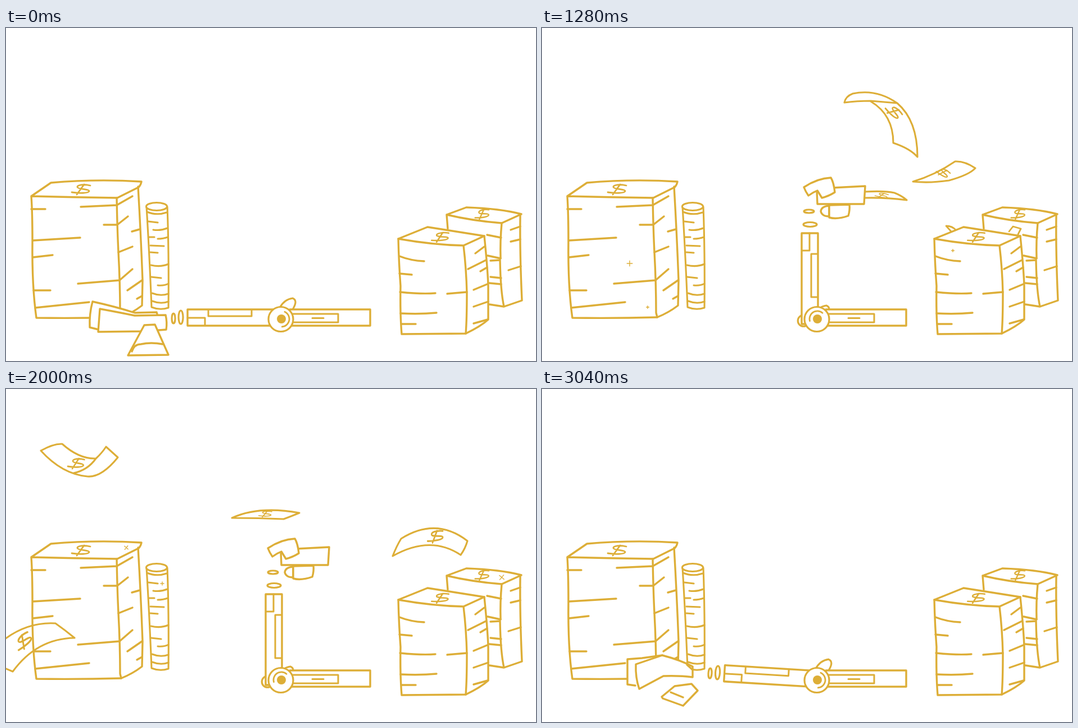
These frames come from a looping animation (943x594 px, 3120 ms). An HTML page with a canvas:

```html
<!DOCTYPE html>
<html lang="en">
<head>
<meta charset="utf-8">
<title>Money arm</title>
<style>
html, body { margin: 0; width: 100%; height: 100%; overflow: hidden; background: #fff; }
canvas { display: block; width: 943px; height: 594px; }
</style>
</head>
<body>
<canvas id="stage"></canvas>
<script>
const W = 943, H = 594, LOOP = 3120, STEP = 80;
const GOLD = '#ddae37';
const PIVOT = [475, 518];
const rad = d => d * Math.PI / 180;

const cv = document.getElementById('stage');
const dpr = window.devicePixelRatio || 1;
cv.width = W * dpr;
cv.height = H * dpr;
const c = cv.getContext('2d');

const cache = {};
const path = d => cache[d] || (cache[d] = new Path2D(d));

function line(d, w = 3.4) {
  c.lineWidth = w;
  c.stroke(path(d));
}
function solid(d, w) {
  c.fillStyle = '#fff';
  c.fill(path(d));
  line(d, w);
}
function oval(x, y, rx, ry, rot = 0, fill = true) {
  c.beginPath();
  c.ellipse(x, y, rx, ry, rot, 0, Math.PI * 2);
  c.fillStyle = '#fff';
  if (fill) c.fill();
  c.lineWidth = 3.2;
  c.stroke();
}
function within(fn, draw) {
  c.save();
  fn();
  draw();
  c.restore();
}

// last row whose time has been reached
const pick = (rows, t) => rows.reduce((r, x) => x[0] <= t ? x : r, rows[0]);

const DOLLAR = 'M14,-7C2,-10 -10,-8 -9,-4C-8,0 12,-1 12,3C11,7 -6,7 -19,5M3,-9L-10,9';
function dollar(x, y, rot = 0, sx = 1, sy = 1) {
  within(() => { c.translate(x, y); c.rotate(rad(rot)); c.scale(sx, sy); }, () => line(DOLLAR, 2.8));
}

/* ---------- piles ---------- */
const bigPile = [
  'M45,300L80,276Q160,269 241,274Q240,280 236,284L198,303Q120,302 45,300Q47,330 47,380Q46,460 54,517Q130,518 205,516',
  'M197,303Q198,360 200,400Q203,455 203,508L205,516Q225,508 242,495L243,450Q240,370 235,283',
  'M45,323L70,323M133,319L197,316L225,300M174,351L198,351L217,336M48,379L132,374M48,409L83,405M128,456L202,450L225,430M49,468L79,468M52,499L148,489',
  'M224,363L238,359M200,400L225,390M216,468L242,450M233,483L242,478'
];
const coins = [
  'M250,319Q255,400 259,498Q274,504 289,499Q290,400 287,319',
  'M251,328Q268,335 286,329M253,345L270,347M262,360Q275,362 287,357M254,373h10M270,376Q280,376 288,373M257,388L281,389M257,400L270,401',
  'M258,423Q275,427 289,421M258,444L276,446M270,459Q282,460 289,456M260,473Q275,479 289,474M260,487Q275,493 289,488'
];
const backPile = [
  'M784,333L819,320Q880,322 917,332L882,348Q830,344 784,333L786,358',
  'M882,348Q879,380 880,411M879,415Q880,470 886,497L860,493M915,334Q914,400 918,486L886,497',
  'M856,369L881,374M857,406L880,411M862,415L879,414M862,444L881,446M860,455L881,457M898,360L915,354M898,381L915,377M894,432L916,425'
];
const frontShape = 'M698,376L750,355L851,371Q857,430 858,460L858,520Q845,532 818,545L704,546Q701,510 702,460Q699,420 698,376Z';
const frontLines = [
  'M698,376Q760,387 814,388L851,371M814,388Q819,430 820,473Q820,520 818,545',
  'M700,407Q720,415 744,416M700,438L722,440M701,471Q740,475 764,473M785,474L820,471M702,509Q735,511 766,508M704,528L729,528',
  'M835,402L851,390M822,430L854,414M844,434L856,427M832,467L856,457M832,497L858,488M832,527L857,520'
];

function piles(t) {
  bigPile.forEach(d => line(d));
  dollar(136, 288);
  coins.forEach(d => line(d, 3.1));
  oval(268, 318.5, 18.5, 7);
  backPile.forEach(d => line(d));
  dollar(849, 332, -8, .8, .9);
  if (t >= 1200 && t < 1440) {
    solid('M728,363L719,353Q730,353 737,361', 2.8);
    solid('M831,363L838,354L852,358L847,368', 2.8);
  }
  solid(frontShape);
  frontLines.forEach(d => line(d));
  dollar(775, 373, -4, .95, .9);
}

/* ---------- flying notes ---------- */
const shapes = {
  slip: ['M575,292Q610,290 627,294Q640,299 649,307Q610,302 575,303', 606, 299, 10, .7, .5],
  arch: ['M538,133Q540,122 553,117Q595,108 632,134Q668,165 668,230Q655,215 625,205Q625,155 585,131M538,133Q560,130 585,130L632,134', 627, 151, 42, .9, 1],
  wing: ['M660,274Q700,262 735,238Q752,237 771,250Q760,262 724,272Q690,277 660,274Z', 715, 259, 30, .7, .8],
  dip: ['M482,150Q503,158 528,160Q505,210 470,217Q445,210 423,196Q465,190 482,150Z', 484, 184, 45, .85, .9],
  curl: ['M651,125Q665,155 662,185Q661,210 656,216Q645,222 627,223Q640,190 633,152M651,125Q630,133 613,143Q645,150 660,178', 649, 179, 60, .75, 1],
  drop: ['M797,-1Q825,15 838,62M818,-2L844,12Q838,35 840,62Q840,90 832,106Q815,111 792,106Q788,100 797,88Q820,50 816,16', 823, 60, 62, .95, 1],
  flat: ['M663,283Q700,275 737,254Q765,255 793,267Q755,295 720,299Q690,297 663,283Z', 729, 277, 22, .9, .95],
  wide: ['M119,489Q195,490 219,423Q250,437 285,443Q255,515 176,523Q145,510 119,489Z', 212, 475, 12, 1.2, 1.7],
  fold: ['M62,110Q85,97 100,98Q130,125 160,124Q170,115 178,103L199,122Q170,158 145,156Q100,152 62,110M160,124Q145,145 120,150', 127, 133, 0, .9, 1],
  thin: ['M402,230Q450,208 522,221Q505,228 494,232Q450,230 402,230Z', 463, 223, 0, .7, .6],
  bow: ['M688,298Q695,280 703,267Q765,228 821,271Q817,285 809,296Q755,260 688,298Z', 766, 263, -10, .9, 1.1],
  exit: ['M-2,446Q40,415 88,418Q105,430 122,444Q55,445 12,504L-2,498', 33, 449, -40, 1, 1.2]
};
// shape, first step, last step, time at home place, dx, dy, turn per step
const flights = [
  ['slip', 960, 1040, 1040, 35, -2, 0],
  ['wing', 1040, 1360, 1280, 38, -8, 3],
  ['arch', 1120, 1440, 1280, 18, -16, 4],
  ['slip', 1200, 1280, 1280, 35, -2, 0],
  ['slip', 1360, 1440, 1440, 35, -2, 0],
  ['drop', 1440, 1760, 1680, 20, -45, -3],
  ['curl', 1520, 1760, 1680, 6, 10, 4],
  ['flat', 1520, 1760, 1680, 8, 4, 2],
  ['dip', 1520, 1840, 1680, -4, 10, 3],
  ['wide', 1520, 1760, 1680, -24, 12, 3],
  ['fold', 1760, 2080, 2000, 3, 28, -3],
  ['thin', 1920, 2080, 2000, -3, 10, -2],
  ['bow', 1840, 2080, 2000, 6, 7, 2],
  ['exit', 1840, 2080, 2000, -36, -3, -2]
];

function notes(t) {
  for (const [name, from, to, home, dx, dy, turn] of flights) {
    if (t < from || t > to) continue;
    const [d, x, y, ...tilt] = shapes[name];
    const n = (t - home) / STEP;
    within(() => {
      c.translate(x + dx * n, y + dy * n);
      c.rotate(rad(turn * n));
      c.translate(-x, -y);
    }, () => { line(d, 3.1); dollar(x, y, ...tilt); });
  }
}

/* ---------- arm ---------- */
const hands = {
  rest: { a: 0, parts: [
    'M154,488Q195,497 229,508L268,507L270,514L262,538L165,538L149,534Q148,510 154,488Z',
    'M167,501Q200,507 229,513L284,512Q287,525 285,538L246,541L164,542Z',
    'M246,530L265,529L289,583L217,584Z'],
    marks: 'M224,577Q228,564 240,564Q258,560 279,564' },
  swing: { a: 36, parts: [
    'M288,260L300,263Q306,265 305,270L299,330L313,355L307,376L288,334Z',
    'M258,356Q239,325 240,276Q262,261 287,253L288,334L308,365L307,376L299,386',
    'M243,384Q262,370 275,352Q285,375 295,390Q305,397 320,395L317,406Q300,412 278,411Q262,395 243,384Z'] },
  shoot: { a: 90, parts: [
    'M489,291L490,314L573,314L575,282L517,285Z',
    'M511,317Q497,318 496,327Q498,336 511,336Z',
    'M511,316L511,338Q525,342 545,335Q548,325 547,315Z',
    'M466,284Q490,268 514,267Q519,275 521,293Q510,300 498,303L490,290Q482,293 474,299Q469,292 466,284Z'] },
  fist: { a: 90, parts: [
    'M490,291L491,313L506,313L506,292',
    'M511,320Q498,320 497,330L512,335Z',
    'M508,286L546,284Q548,300 547,320Q530,322 511,320Q506,310 508,286Z',
    'M514,320L547,320L547,341L513,341Q511,330 514,320Z',
    'M467,284Q490,272 514,270Q520,280 522,293L498,302L490,291Q480,293 472,299Z'],
    marks: 'M524,292L538,293' },
  fall: { a: 3.5, parts: [
    'M214,475L178,480L152,482L152,527L166,529',
    'M167,491L214,475Q245,483 268,495L268,514Q245,511 216,512L173,535Q166,515 167,491Z',
    'M213,549L236,530L266,526L277,538L251,565L215,552Z'],
    marks: 'M229,541L251,550M258,492L268,501' }
};
// time, angle, hand, lift
const moves = [
  [0, 0, 'rest', 0], [320, 5, 'rest', 0], [400, 17, 'rest', 0], [480, 36, 'swing', 0],
  [560, 52, 'swing', 0], [640, 74, 'shoot', 0], [720, 85, 'shoot', 0], [800, 90, 'shoot', 0],
  [2480, 90, 'fist', 0], [2640, 90, 'fist', 18], [2720, 90, 'fist', 36],
  [2880, 62, 'fall', 0], [2960, 28, 'fall', 0], [3040, 3.5, 'fall', 0]
];
const slide = a => 10 * Math.sin(rad(2 * a));

function turned(a, from, draw) {
  const [x, y] = PIVOT;
  within(() => {
    c.translate(x + slide(a) - slide(from), y);
    c.rotate(rad(a - from));
    c.translate(-x, -y);
  }, draw);
}

function elbow(a) {
  const k = a / 90, dir = rad(50 - .47 * a), far = 24 * Math.min(1, a / 36);
  within(() => c.translate(-4 * k, 13 * Math.pow(k, 1.3)),
    () => solid('M487,499Q495,484 510,482Q520,486 510,502', 3.2));
  if (a > 10) oval(489 - far * Math.cos(dir), 519 + far * Math.sin(dir), 10, 10);
}

function joint(a) {
  oval(489, 519.5, 22, 22);
  c.beginPath();
  c.arc(490, 519, 8, 0, Math.PI * 2);
  c.fillStyle = GOLD;
  c.fill();
  const [from, to] = a < 10 ? [-65, 85] : [165, 310];
  c.beginPath();
  c.arc(490, 519, 14, rad(from), rad(to));
  c.lineWidth = 2.8;
  c.stroke();
}

function arm(t) {
  const [, a, name, lift] = pick(moves, t);
  const hand = hands[name];
  const reach = 14 * a / 90;
  elbow(a);
  solid('M505,502H648V531H505Z');
  line('M505,510H591V525H505M545,517.5H565', 3);
  turned(a, 0, () => {
    solid('M323,502H485V531H323Z');
    line('M360,503V514H437V503M323,517H354V530', 3);
    oval(298 - reach - lift / 2, 518, 3, 9);
    oval(311 - reach / 4 - lift / 3, 516, 4, 12);
  });
  joint(a);
  turned(a, hand.a, () => {
    c.translate(0, -lift);
    hand.parts.forEach(d => solid(d));
    if (hand.marks) line(hand.marks);
  });
  if (t === 480) {
    line('M320,343Q343,325 339,319Q335,315 324,322', 3);
    line('M195,347Q205,322 232,306M197,349Q230,340 256,324M240,398Q232,430 232,457', 3);
  }
}

/* ---------- sparkles ---------- */
// size rows, then x, y, radius, turn of each star
const sparks = [
  { size: [[0, 0], [320, .3], [400, .7], [480, 1], [560, .9], [640, .6], [720, .3], [800, 0]],
    stars: [[136, 343, 9, 0], [89, 391, 3, 0], [846, 352, 6, 0]] },
  { size: [[0, 0], [960, .3], [1040, .7], [1120, 1], [1200, .8], [1280, .6], [1360, .4], [1440, 0]],
    stars: [[156, 420, 8, 0], [188, 498, 4, 0], [731, 397, 4, 0]] },
  { size: [[0, 0], [1920, .3], [2000, .6], [2080, 1], [2160, .8], [2480, .55], [2640, .45], [2720, .35], [2880, .2], [2960, 0]],
    stars: [[214, 283, 7, 40], [278, 347, 5, 0], [882, 336, 9, 40]] }
];

function sparkle(t) {
  for (const { size, stars } of sparks) {
    const k = pick(size, t)[1];
    if (!k) continue;
    for (const [x, y, r, turn] of stars) {
      const s = r * k;
      within(() => { c.translate(x, y); c.rotate(rad(turn)); }, () => {
        c.beginPath();
        c.moveTo(-s, 0);
        c.lineTo(s, 0);
        c.moveTo(0, -s);
        c.lineTo(0, s);
        c.lineWidth = s > 6 ? 2.1 : 1.4;
        c.stroke();
      });
    }
  }
}

function frame(now) {
  const t = Math.floor((now % LOOP) / STEP) * STEP;
  c.setTransform(dpr, 0, 0, dpr, 0, 0);
  c.fillStyle = '#fff';
  c.fillRect(0, 0, W, H);
  c.strokeStyle = GOLD;
  c.lineCap = c.lineJoin = 'round';
  piles(t);
  sparkle(t);
  notes(t);
  arm(t);
}

let start = null;
function tick(now) {
  if (start === null) start = now;
  frame(now - start);
  requestAnimationFrame(tick);
}
frame(0);
requestAnimationFrame(tick);
</script>
</body>
</html>
```
